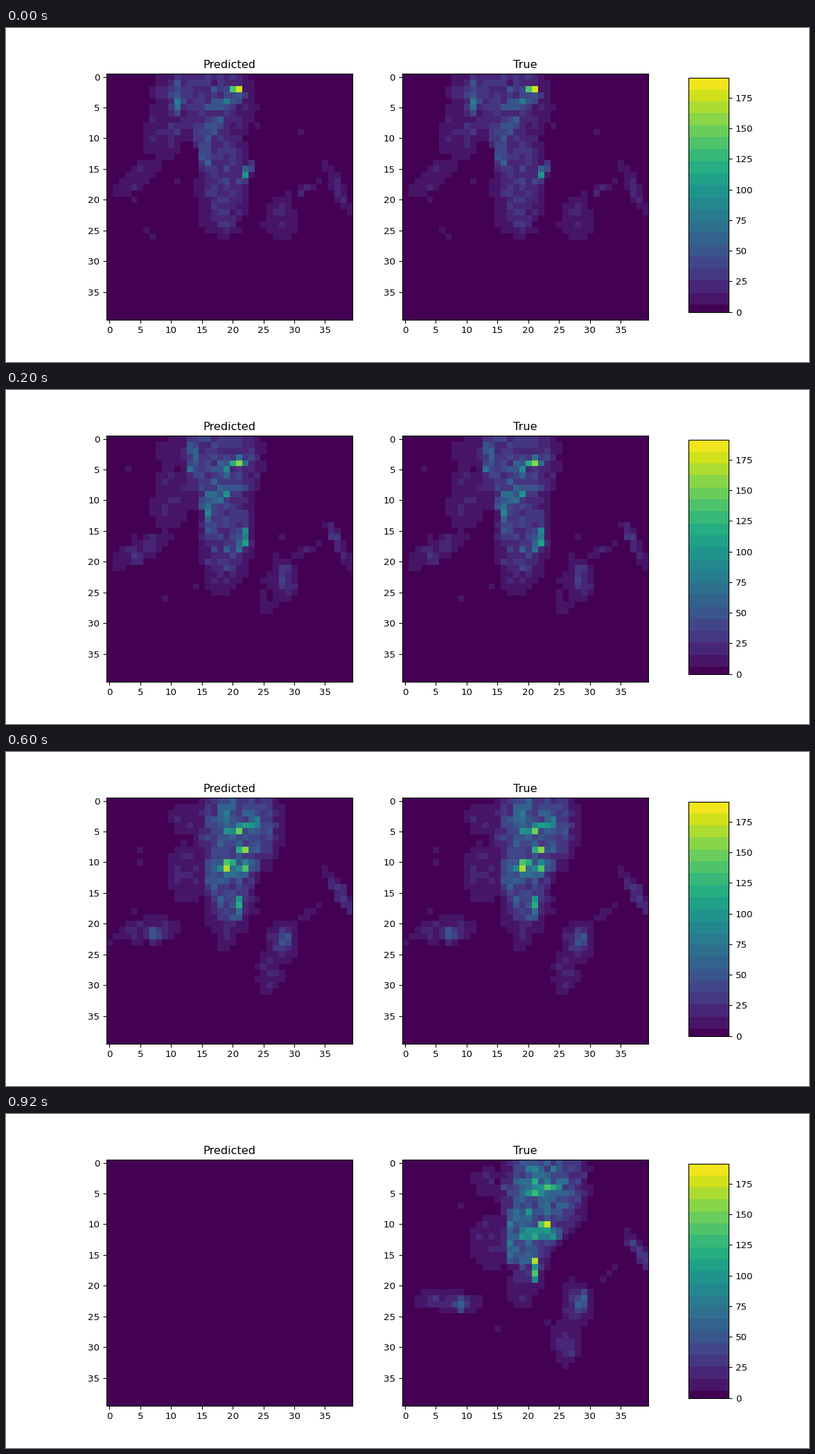
Recreate the animation shown at these times as a matplotlib script. Size 1159 px wide and 483 px high, loop 1 s.

```python
import numpy as np
import matplotlib.pyplot as plt
from matplotlib.animation import FuncAnimation
from matplotlib.colors import ListedColormap

N, STEPS, VMAX = 40, 5, 191
FIRST_BAND, BAND = 5.8, 9.78
X, Y = np.meshgrid(np.arange(N), np.arange(N))


class RainMap:
    """Rainfall at one moment, u running from 0 to 1 over the loop."""

    def __init__(self, u):
        self.u = u
        self.z = np.zeros((N, N))

    def cell(self, start, end, size, level, tilt=(0, 0)):
        """Flat-topped elliptic rain cell drifting from start to end."""
        def at(pair):
            return pair[0] + (pair[1] - pair[0]) * self.u

        dx = X - at((start[0], end[0]))
        dy = Y - at((start[1], end[1]))
        a = np.radians(at(tilt))
        along = (dx * np.cos(a) + dy * np.sin(a)) / size[0]
        across = (dy * np.cos(a) - dx * np.sin(a)) / size[1]
        r2 = along ** 2 + across ** 2
        self.z = np.maximum(self.z, at(level) * np.exp(-r2 ** 2))


def rain(i):
    m = RainMap(i / (STEPS - 1))

    # main column and its faint fringes
    m.cell((16.5, 4), (22.5, 4), (6.4, 7.5), (27, 52))
    m.cell((18.5, 16), (19.8, 9.5), (4, 9.5), (26, 48))
    m.cell((9, 9), (13.5, 13), (3.4, 5), (17, 13))
    m.cell((9, 2), (13, 3), (2.2, 3), (14, 11))
    m.cell((17, 22), (19, 20), (2.6, 4), (15, 12))

    # bright ridges inside the column
    m.cell((11, 3), (21, 2), (1.3, 3.5), (50, 70))
    m.cell((19, 4), (22.5, 4.5), (4, 1.1), (58, 105), (-17, -17))
    m.cell((17, 8), (21.5, 11.5), (4, 1.6), (45, 108), (-40, 0))
    m.cell((15.5, 12), (17, 12), (0.8, 4.5), (48, 68))
    m.cell((22, 16), (21, 17), (0.8, 2.5), (72, 105), (20, 0))

    # separate shower on the lower right
    m.cell((28, 23), (28, 23), (2.6, 3.6), (16, 21))
    m.cell((26, 24), (26, 29), (2.3, 4), (5, 17))
    m.cell((28, 23), (28.5, 22.5), (1.4, 1.8), (20, 58))

    # arms on both sides
    m.cell((4.5, 16.5), (7, 22.5), (5.5, 1.9), (14, 19), (-40, 5))
    m.cell((3, 18), (9, 23), (1.2, 1.2), (15, 68))
    m.cell((31, 18.5), (33, 18), (3.8, 0.8), (12, 9), (-25, -40))
    m.cell((37, 18), (38, 14.5), (4.5, 1), (19, 28), (65, 55))

    rng = np.random.default_rng(40 + i)
    z = m.z * rng.lognormal(0, 0.25, (N, N))

    # loose drops around the showers
    drops = rng.integers(0, 32, (8, 2))
    for x, y in drops:
        z[y, x] = max(z[y, x], rng.uniform(8, 14))

    # the strongest echo sinks by two rows per step
    row, col = 2 + 2 * i, 21 + i // 2
    z[row, col - 1:col + 1] = (155 + 25 * np.cos(np.pi * i / 2)) * np.array([0.78, 1])
    return np.minimum(z, VMAX)


def banded_viridis(n=764):
    """Viridis cut into flat bands, the first one narrower."""
    v = np.linspace(0, VMAX, n)
    band = np.floor((v - FIRST_BAND) / BAND)
    mid = np.where(band < 0, 0, FIRST_BAND + (band + 0.5) * BAND)
    return ListedColormap(plt.get_cmap("viridis")(mid / VMAX))


truth = [rain(i) for i in range(STEPS)]
predicted = truth[:-1] + [np.zeros((N, N))]

plt.rcParams.update({"font.family": "DejaVu Sans", "font.size": 9.66,
                     "axes.titlepad": 5.8, "xtick.major.pad": 3.4,
                     "ytick.major.pad": 3.4})
fig, axes = plt.subplots(1, 2, figsize=(11.59, 4.83), dpi=100)
fig.subplots_adjust(left=0.125, right=0.8, bottom=0.11, top=0.88, wspace=0.2)

cmap = banded_viridis()
images = []
for ax, title in zip(axes, ("Predicted", "True")):
    images.append(ax.imshow(np.zeros((N, N)), cmap=cmap, vmin=0, vmax=VMAX,
                            interpolation="nearest"))
    ax.set_title(title)
    ax.set_xticks(range(0, N, 5))
    ax.set_yticks(range(0, N, 5))

fig.colorbar(images[0], cax=fig.add_axes([0.85, 0.15, 0.05, 0.7]),
             ticks=range(0, 176, 25))


def update(i):
    images[0].set_data(predicted[i])
    images[1].set_data(truth[i])
    return images


anim = FuncAnimation(fig, update, frames=STEPS, interval=200,
                     repeat=True, repeat_delay=0)
plt.show()
```
